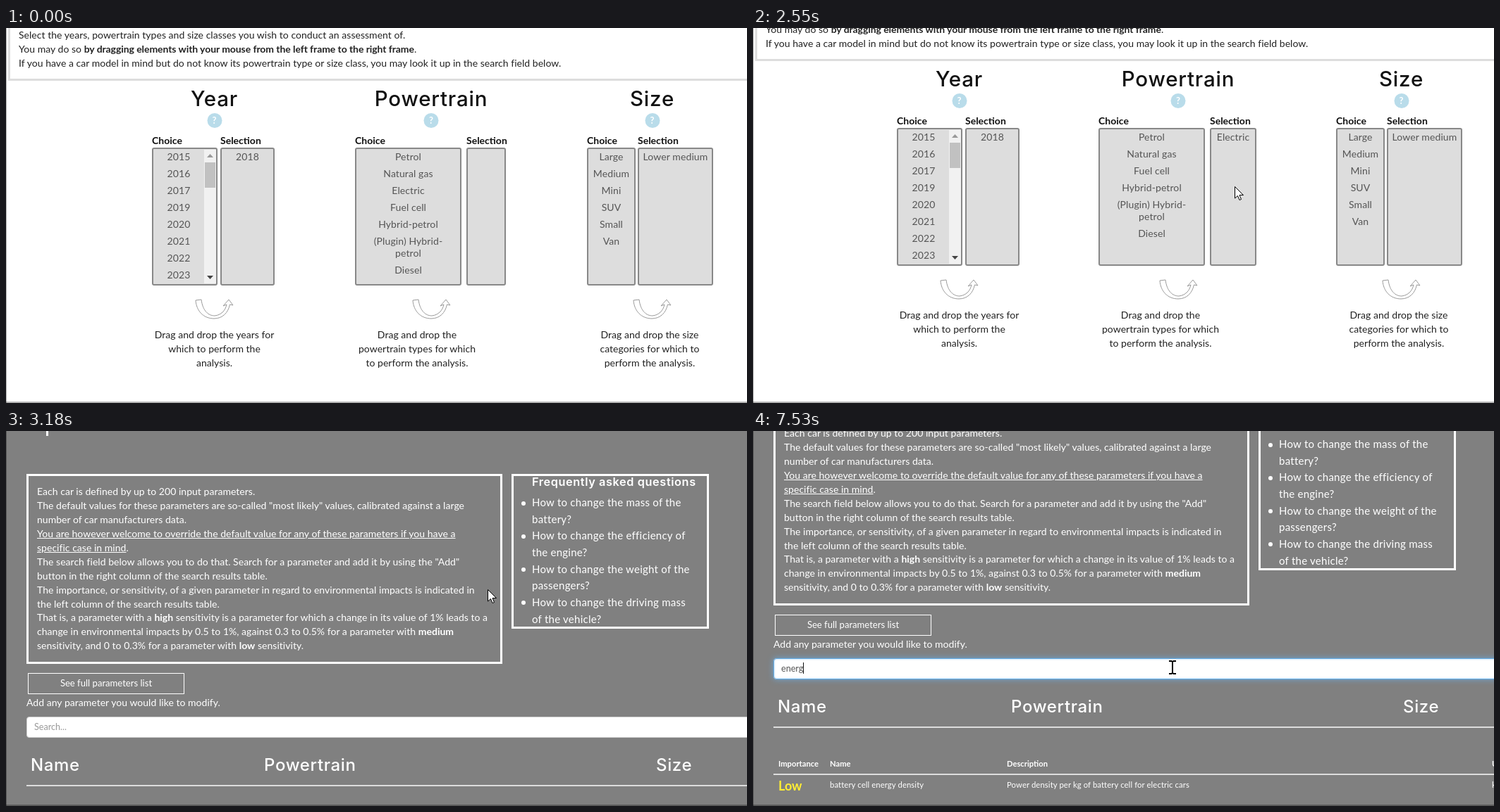
Recreate the animation shown at these times as an HTML page. Size 1051x533 px, loop 8000 ms.

```html
<!DOCTYPE html>
<html lang="en">
<head>
<meta charset="utf-8">
<title>Car assessment form</title>
<style>
html, body { margin: 0; width: 100%; height: 100%; overflow: hidden; background: #fff; }
#stage { position: relative; width: 100%; height: 100%; overflow: hidden;
  font: 14px/20px Lato, sans-serif; letter-spacing: .03px; color: #222; }
:where(#stage div, #stage svg) { position: absolute; left: 0; top: 0; box-sizing: border-box; white-space: pre; }
#stage svg { overflow: visible; }
#page { width: 1051px; height: 1400px; will-change: transform; }
.notice { left: 3px; top: -60px; width: 1100px; height: 135px; border: 3px solid #ddd; }
.notice + div b { letter-spacing: -.07px; }
.mid { transform: translateX(-50%); text-align: center; }
.title { font: 500 29.5px/36px Inter, sans-serif; letter-spacing: .8px; color: #111; top: 82px; }
.help { width: 21px; height: 21px; top: 121px; border-radius: 50%; background: #b9dcea;
  color: #fff; font: bold 13px/21px Lato, sans-serif; }
.label { top: 150px; font-weight: bold; letter-spacing: 0; color: #111; }
.list { top: 170px; height: 196px; background: #ddd; border: 2px solid #888; border-radius: 3px; }
.items { right: 0; top: -1px; text-align: center; color: #555; line-height: 16.8px; letter-spacing: .1px; }
.item { position: relative; padding: 3.65px 0; }
.drag .list:not(.from) { background: #fff; border-color: #5b82bd; }
.held .pick, .ghost { background: #85a9de; color: #fff; box-shadow: inset 0 0 0 1px #6489c4, inset 0 0 0 2px #a4c0ea; }
.ghost { width: 147px; height: 22px; line-height: 22px; text-align: center; opacity: .72; }
.after .y { transform: translateX(-3px); }
.after .p { transform: translateX(-5px); }
.after .s { transform: translateX(3px); }
#dropBox { width: 56px; }
.after #dropBox { width: 66px; }
.dropped, .after .pick { display: none; }
.after .dropped { display: block; }
.bar { left: auto; right: 0; top: 1px; width: 17px; bottom: 1px; background: #f1f1f1; }
.thumb { left: 1px; top: 18px; width: 15px; height: 36px; background: #c1c1c1; }
#params { top: 583px; width: 1051px; height: 820px; background: #808080; }
.w { color: #fff; }
.frame { border: 3px solid #fff; top: 694px; }
.head { font: 500 24px/30px Inter, sans-serif; letter-spacing: .65px; color: #fff; top: 1093px; }
.rule { left: 29px; width: 1030px; height: 2px; background: #ddd; }
.info { left: 44px; top: 709px; line-height: 19.93px; }
.info b { letter-spacing: 0; }
.faq { left: 746px; line-height: 23.66px; font-size: 15px; letter-spacing: .25px; top: 723px; }
.dot { left: 731px; width: 6px; height: 6px; border-radius: 50%; background: #fff; }
.input { left: 29px; top: 1039px; width: 1060px; height: 30px; border-radius: 4px; background: #fff; border: 1px solid #ccc; }
#focus { background: none; border-color: #66afe9; box-shadow: 0 0 8px rgba(102,175,233,.8), inset 0 0 3px rgba(102,175,233,.5); }
#field, #hint { left: 40px; top: 1044px; font-size: 12.6px; letter-spacing: 0; color: #555; }
#hint { color: #999; }
#caret { display: inline-block; width: 1px; height: 16px; background: #111; vertical-align: -3px; }
.th { top: 1178.5px; font-size: 11.2px; font-weight: bold; letter-spacing: 0; color: #fff; }
.td { top: 1208.5px; font-size: 11.3px; letter-spacing: .1px; color: #fff; }
.low { left: 36px; top: 1209.5px; font: bold 18px/20px Lato, sans-serif; letter-spacing: 0; color: #ffee33; }
#halo { width: 26px; height: 26px; margin: -13px; border-radius: 50%; background: rgba(238,230,40,.8); }
.edge { background: rgba(0,0,0,.3); }
#left { width: 1px; height: 533px; }
#bottom { top: 531px; width: 1051px; height: 2px; }
</style>
</head>
<body>
<div id="stage">
  <div id="page">
    <div class="notice"></div>
    <div style="left:18px">Select the years, powertrain types and size classes you wish to conduct an assessment of.
You may do so <b>by dragging elements with your mouse from the left frame to the right frame</b>.
If you have a car model in mind but do not know its powertrain type or size class, you may look it up in the search field below.</div>
    <div id="columns"></div>

    <div id="params"></div>
    <svg style="top:583px" width="60" height="60" fill="none" stroke="#fff">
      <g id="gears"></g><path d="M58.5 0V57" stroke-width="3"/>
    </svg>
    <div class="title w" style="left:66px;top:592px;font-size:28.5px;letter-spacing:1.1px">CAR PARAMETERS</div>
    <div class="frame" style="left:29px;width:675px;height:270px"></div>
    <div class="info w">Each car is defined by up to 200 input parameters.
The default values for these parameters are so-called "most likely" values, calibrated against a large
number of car manufacturers data.
<u>You are however welcome to override the default value for any of these parameters if you have a
specific case in mind</u>.
The search field below allows you to do that. Search for a parameter and add it by using the "Add"
button in the right column of the search results table.
The importance, or sensitivity, of a given parameter in regard to environmental impacts is indicated in
the left column of the search results table.
That is, a parameter with a <b>high</b> sensitivity is a parameter for which a change in its value of 1% leads to a
change in environmental impacts by 0.5 to 1%, against 0.3 to 0.5% for a parameter with <b>medium</b>
sensitivity, and 0 to 0.3% for a parameter with <b>low</b> sensitivity.</div>
    <div class="frame" style="left:717px;width:280px;height:220px"></div>
    <div class="w" style="left:746px;top:695px;font:600 16.3px/20px Inter,sans-serif;letter-spacing:.6px">Frequently asked questions</div>
    <div class="faq w">How to change the mass of the
battery?
How to change the efficiency of
the engine?
How to change the weight of the
passengers?
How to change the driving mass
of the vehicle?</div>
    <div id="dots"></div>
    <div style="left:31px;top:977px;width:222px;height:30px;border:1px solid #fff"></div>
    <div class="w mid" style="left:142px;top:981px;font-size:13.1px;letter-spacing:0">See full parameters list</div>
    <div class="w" style="left:29px;top:1009px">Add any parameter you would like to modify.</div>
    <div class="input"></div>
    <div class="input" id="focus"></div>
    <div id="hint">Search...</div>
    <div id="field"><span id="typed"></span><span id="caret"></span></div>
    <div class="head" style="left:35px">Name</div>
    <div class="head" style="left:366px">Powertrain</div>
    <div class="head" style="left:922px">Size</div>
    <div class="rule" style="top:1136px"></div>
    <div class="rule" style="top:1203px"></div>
    <div id="idle"></div>
    <div id="results"><div class="low">Low</div></div>
  </div>
  <div class="ghost" id="ghost">Electric</div>
  <div id="halo"></div>
  <svg id="arrow" width="16" height="28" fill="#fff" stroke="#000">
    <rect id="badge" x="3" y="17" width="10" height="9" stroke="#777" stroke-width="2"/>
    <path d="M.5 .5V17L4.5 13.5L7 19.5L9.5 18.5L7 12.5H12.5Z"/>
  </svg>
  <svg id="beam" width="1" height="1" fill="none" stroke="#000" stroke-width="2">
    <path d="M-5 -9H-1.5L0 -8L1.5 -9H5M-5 9H-1.5L0 8L1.5 9H5M0 -8V8"/>
  </svg>
  <div class="edge" id="left"></div>
  <div class="edge" id="bottom"></div>
</div>
<script>
const $ = id => document.getElementById(id);
const stage = $('stage');

// Three choosers: left/width of both boxes, centres and contents.
const columns = [
  { key: 'y', fixed: 'y', title: 'Year', mid: 295.5, text: 295.5, boxes: [[207, 93], [304, 77]],
    items: ['2015', '2016', '2017', '2019', '2020', '2021', '2022', '2023'],
    chosen: '2018', note: 'Drag and drop the years for\nwhich to perform the\nanalysis.' },
  { key: 'p', fixed: '', title: 'Powertrain', mid: 603, text: 583, boxes: [[495, 151], [653, 56]],
    items: ['Petrol', 'Natural gas', 'Electric', 'Fuel cell', 'Hybrid-petrol', '(Plugin) Hybrid-\npetrol', 'Diesel'],
    chosen: 'Electric', note: 'Drag and drop the\npowertrain types for which\nto perform the analysis.' },
  { key: 's', fixed: 's', title: 'Size', mid: 916.5, text: 913, boxes: [[824, 69], [896, 107]],
    items: ['Large', 'Medium', 'Mini', 'SUV', 'Small', 'Van'],
    chosen: 'Lower medium', note: 'Drag and drop the size\ncategories for which to\nperform the analysis.' }
];
const item = (text, cls = '') => `<div class="item ${cls}">${text}</div>`;
const scrollbar = `<div class="bar"><div class="thumb"></div><svg width="17" height="190">
  <path d="M4 11L8.5 6L13 11Z" fill="#999"/><path d="M4 179L8.5 184L13 179Z" fill="#444"/></svg></div>`;
const bend = 'M0 2L8 1C10 17 18 24 27 24C36 23 42 17 44 8L39 10L47 1L53 9L48.5 8C46 20 38 28 26 28C11 28 1 17 0 2Z';

function chooser(c) {
  const [[ax, aw], [bx, bw]] = c.boxes, power = c.key === 'p', year = c.key === 'y';
  const list = c.items.map(s => item(s, s === 'Electric' ? 'pick' : '')).join('');
  return `<div class="${c.fixed}">
    <div class="title mid" style="left:${c.mid}px">${c.title}</div>
    <div class="help mid" style="left:${c.mid}px">?</div>
    <svg style="left:${c.mid - 26.5}px;top:385px" width="54" height="29"><path d="${bend}" fill="#fff" stroke="#999"/></svg>
  </div><div class="${c.key}">
    <div class="label" style="left:${ax}px">Choice</div>
    <div class="label" style="left:${bx}px">Selection</div>
    <div class="list ${power ? 'from' : ''}" style="left:${ax}px;width:${aw}px">
      <div class="items" style="right:${year ? 17 : 0}px">${list}</div>${year ? scrollbar : ''}</div>
    <div class="list" ${power ? 'id="dropBox"' : ''} style="left:${bx}px;${power ? '' : `width:${bw}px`}">
      <div class="items">${item(c.chosen, power ? 'dropped' : '')}</div></div>
    <div class="mid" style="left:${c.text}px;top:425.5px">${c.note}</div>
  </div>`;
}
$('columns').innerHTML = columns.map(chooser).join('');

const gear = (x, y, r, teeth) => `<circle cx="${x}" cy="${y}" r="${r * .62}" stroke-width="${r * .45}"/>
  <circle cx="${x}" cy="${y}" r="${r * .88}" stroke-width="${r * .24}" pathLength="${teeth * 2}" stroke-dasharray="1"/>`;
$('gears').innerHTML = gear(15.5, 30.5, 13.5, 9) + gear(35, 22, 9, 8);
$('dots').innerHTML = [0, 1, 2, 3].map(i => `<div class="dot" style="top:${732.5 + i * 47.3}px"></div>`).join('');

const cells = (cls, row) => row.map(([x, s]) => `<div class="${cls}" style="left:${x}px">${s}</div>`).join('');
$('idle').innerHTML = cells('th', [[36, 'Importance'], [264, 'Name'], [402, 'Description'], [633, 'Unit'], [748, 'Source'], [903, 'Applies to powertrain']]);
$('results').innerHTML += cells('th', [[36, 'Importance'], [109, 'Name'], [360, 'Description'], [1048, 'Unit']]) +
  cells('td', [[109, 'battery cell energy density'], [360, 'Power density per kg of battery cell for electric cars'], [1048, 'kWh/kg']]);

// [time, ...values], linear between rows
const pointer = [[280, 808, 416], [440, 752, 370], [620, 670, 298], [800, 610, 244], [980, 589, 225],
  [1460, 589, 225], [1691, 641, 222], [1850, 672, 223], [2000, 683, 225], [3580, 683, 225],
  [3650, 677, 229], [3900, 632, 286], [4100, 599, 330], [4180, 595, 336]];
const scroll = [[2480, 0], [2550, 28], [2706, 163], [2940, 405], [3174, 633], [3330, 702], [3410, 716]];
// [start, end, steps] of each move; the last one holds the scroll until it settles
const moves = [[280, 980, 10], [1460, 2000, 8], [2550, 3330, 11], [3330, 3410, 2], [3650, 4180, 8]];
const typing = [[0, ''], [6750, 'e'], [6920, 'en'], [7150, 'ene'], [7300, 'ener'], [7530, 'energ']];

function snap(t) {
  const move = moves.find(([a, b]) => t >= a && t < b);
  if (!move) return t;
  const [a, b, n] = move, d = (b - a) / (n - 1);
  return a + Math.floor((t - a) / d) * d;
}
function track(rows, t) {
  const i = rows.findIndex(r => r[0] > t);
  if (i < 0) return rows[rows.length - 1].slice(1);
  if (i === 0) return rows[0].slice(1);
  const a = rows[i - 1], b = rows[i], k = (t - a[0]) / (b[0] - a[0]);
  return a.slice(1).map((v, j) => v + (b[j + 1] - v) * k);
}
const show = (id, on) => { $(id).style.display = on ? '' : 'none'; };
const place = (id, x, y) => { $(id).style.transform = `translate(${Math.round(x)}px,${Math.round(y)}px)`; };

function render(t) {
  const s = snap(t), [x, y] = track(pointer, s);
  const held = t >= 1460 && t < 2250, drag = t >= 1530 && t < 2250;
  const onInput = t >= 3650 && y > 322;
  stage.classList.toggle('held', held);
  stage.classList.toggle('drag', drag);
  stage.classList.toggle('after', t >= 2250);
  place('page', 0, t < 2550 ? 0 : -track(scroll, s)[0]);

  place('arrow', x, y);
  place('beam', x, y);
  place('halo', x, y);
  place('ghost', x - 61, y - 2);
  show('arrow', t >= 280 && !onInput);
  show('beam', onInput);
  show('halo', held);
  show('ghost', drag);
  show('badge', drag);

  const text = typing.filter(r => r[0] <= t).pop()[1];
  if ($('typed').textContent !== text) $('typed').textContent = text;
  show('hint', !text);
  $('focus').style.opacity = Math.min(1, Math.max(0, (t - 4600) / 200));
  show('focus', t >= 4640);
  const blinkOn = t >= 4640 && t < 5200 || t >= 5730 && t < 6280 || t >= 6750;
  $('caret').style.visibility = blinkOn ? 'visible' : 'hidden';
  show('idle', t < 7000);
  show('results', t >= 7000);
}

const begin = performance.now();
function tick() {
  render((performance.now() - begin) % 8000);
  requestAnimationFrame(tick);
}
tick();
</script>
</body>
</html>
```
